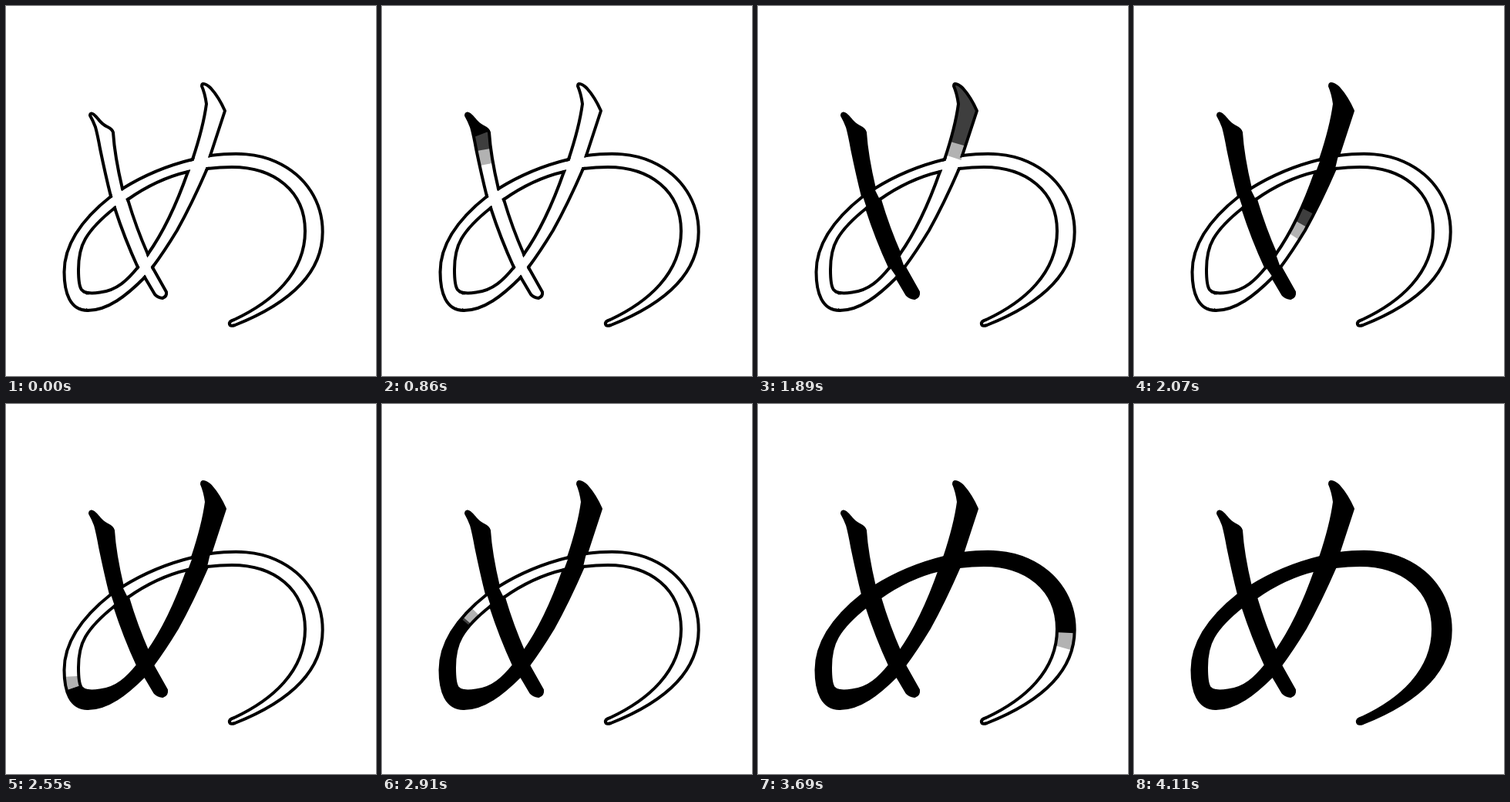
An HTML page without scripts for the animation above (4780 ms loop, 480 by 480 pixels).

```html
<!DOCTYPE html>
<html lang="ja">
<head>
<meta charset="utf-8">
<title>Hiragana stroke order</title>
<style>
  html, body { margin: 0; height: 100%; overflow: hidden; background: #fff; }
  svg { display: block; width: 100%; height: 100%; }

  .outline { fill: none; stroke: #000; stroke-width: 4; stroke-linejoin: round; }
  .around use { stroke: #fff; stroke-width: 4; stroke-linejoin: round; }
  .ink { animation: ink 4780ms step-end infinite; }

  /* Brush paths reveal the ink: a faint lead, a middle tone, then solid. */
  .brush use {
    fill: none; stroke: #fff; stroke-width: 42;
    stroke-dasharray: 200 200; stroke-dashoffset: 200px;
    animation: var(--move) 4780ms step-end infinite;
  }
  .brush .lead { stroke-opacity: .3; }
  .brush .mid { stroke-opacity: .65; }
  .brush .late { animation-delay: 60ms; }

  @keyframes ink {
    0% { visibility: hidden; }
    16.73%, 100% { visibility: visible; }
  }
  @keyframes left {
    0% { stroke-dashoffset: 200px; }
    16.73% { stroke-dashoffset: 185.7px; animation-timing-function: steps(7); }
    25.52%, 100% { stroke-dashoffset: 85.7px; }
  }
  @keyframes down {
    0% { stroke-dashoffset: 200px; }
    39.53% { stroke-dashoffset: 170px; animation-timing-function: steps(3); }
    43.3% { stroke-dashoffset: 140px; animation-timing-function: steps(5); }
    49.58% { stroke-dashoffset: 100px; }
    50.83%, 100% { stroke-dashoffset: 85px; }
  }
  @keyframes loop {
    0% { stroke-dashoffset: 200px; }
    50.83% { stroke-dashoffset: 197.7px; animation-timing-function: steps(8); }
    60.87% { stroke-dashoffset: 179px; }
    62.13% { stroke-dashoffset: 174.4px; animation-timing-function: steps(8); }
    72.17% { stroke-dashoffset: 137.5px; }
    73.43% { stroke-dashoffset: 134px; animation-timing-function: steps(8); }
    83.47% { stroke-dashoffset: 105px; }
    84.72%, 100% { stroke-dashoffset: 85px; }
  }
  @keyframes loop-solid {
    0% { stroke-dashoffset: 200px; }
    50.83% { stroke-dashoffset: 199.8px; animation-timing-function: steps(8); }
    60.87% { stroke-dashoffset: 181.8px; }
    62.13% { stroke-dashoffset: 179.5px; animation-timing-function: steps(5); }
    68.41% { stroke-dashoffset: 163.6px; animation-timing-function: steps(3); }
    72.17% { stroke-dashoffset: 142px; }
    73.43% { stroke-dashoffset: 137px; animation-timing-function: steps(8); }
    83.47% { stroke-dashoffset: 108px; }
    84.72%, 100% { stroke-dashoffset: 85px; }
  }
</style>
</head>
<body>
<svg viewBox="0 0 480 480">
  <defs>
    <path id="left" d="M109 142 Q113 149 116 157 Q119 168 122 185 Q129 219 136 247 L141 262
      Q154 302 171 339 L180 352 L193 374 Q196 378 203 379 Q209 377 208 371 L190 339 L184 322
      Q169 288 158 251 L151 237 Q141 195 139 164 Q138 160 132 157 Q125 154 119 146
      Q113 139 111 139.5 Q109 140 109 142Z"/>
    <path id="down" d="M256 101 Q260 101 266 107 Q276 118 284 136 L265 194 L261 211
      Q241 257 222 291 Q205 319 190 339 L180 352 C156 376 132 395 106 395 L98 392 L100 373 L106 372
      Q112 373 122 371.5 C144 369 158 355 171 339 L184 322 Q213 281 236 215 L242 199
      Q256 157 260 127 Q258 113 254 104 Q254 101 256 101Z"/>
    <path id="loop" d="M106 395 C83 395 75.5 372 75.5 345 C75.5 309 98 277 136 247 L151 237
      C180 219 209 207 242 199 L265 194 C300 190 326 191 350 202 C390 220 410.7 255 410.7 293
      C410.7 348 365 387 297 414 Q291 416 290 413 Q289 409 296 407 C345 384 388 347 388 292
      C388 240 348 209 293 209 Q278 209 261 211 L236 215 C206 222 180 235.5 158 251 L141 262
      C122 277 110 290 103 302 C96 314 94 326 94 342 C94 354 95 364 98 368 Q101 371.5 106 372Z"/>

    <path id="left-path" pathLength="100" d="M106 134 Q125 160 130 185 Q140 245 157 290 Q180 345 206 384"/>
    <path id="down-path" pathLength="100" d="M250 92 Q272 115 270 140 C262 185 243 240 212 293 C185 335 150 385 92 384"/>
    <path id="loop-path" pathLength="100" d="M112 384 C88 384 85 366 85 345 C85 310 110 280 146 250
      C185 225 220 210 255 203 C345 190 400 225 400 293 C400 345 355 382 284 415"/>

    <rect id="page" width="480" height="480" fill="#fff"/>

    <!-- Each outline stays open where another stroke crosses it. -->
    <mask id="around-left" class="around" maskUnits="userSpaceOnUse" x="0" y="0" width="480" height="480">
      <use href="#page"/><use href="#down"/><use href="#loop"/>
    </mask>
    <mask id="around-down" class="around" maskUnits="userSpaceOnUse" x="0" y="0" width="480" height="480">
      <use href="#page"/><use href="#left"/><use href="#loop"/>
    </mask>
    <mask id="around-loop" class="around" maskUnits="userSpaceOnUse" x="0" y="0" width="480" height="480">
      <use href="#page"/><use href="#left"/><use href="#down"/>
    </mask>

    <mask id="left-brush" class="brush" style="--move: left" maskUnits="userSpaceOnUse" x="0" y="0" width="480" height="480">
      <use class="lead" href="#left-path"/>
      <use class="mid" href="#left-path" style="stroke-dasharray: 193 200"/>
      <use class="late" href="#left-path"/>
    </mask>
    <mask id="down-brush" class="brush" style="--move: down" maskUnits="userSpaceOnUse" x="0" y="0" width="480" height="480">
      <use class="lead" href="#down-path"/>
      <use class="mid" href="#down-path" style="stroke-dasharray: 195 200"/>
      <use class="late" href="#down-path"/>
    </mask>
    <mask id="loop-brush" class="brush" style="--move: loop" maskUnits="userSpaceOnUse" x="0" y="0" width="480" height="480">
      <use class="lead" href="#loop-path"/>
      <use class="mid late" href="#loop-path"/>
      <use href="#loop-path" style="--move: loop-solid"/>
    </mask>
  </defs>

  <use href="#page"/>
  <g class="outline">
    <g mask="url(#around-left)"><use href="#left"/></g>
    <g mask="url(#around-down)"><use href="#down"/></g>
    <g mask="url(#around-loop)"><use href="#loop"/></g>
  </g>
  <g class="ink">
    <g mask="url(#left-brush)"><use href="#left"/></g>
    <g mask="url(#down-brush)"><use href="#down"/></g>
    <g mask="url(#loop-brush)"><use href="#loop"/></g>
  </g>
</svg>
</body>
</html>
```
